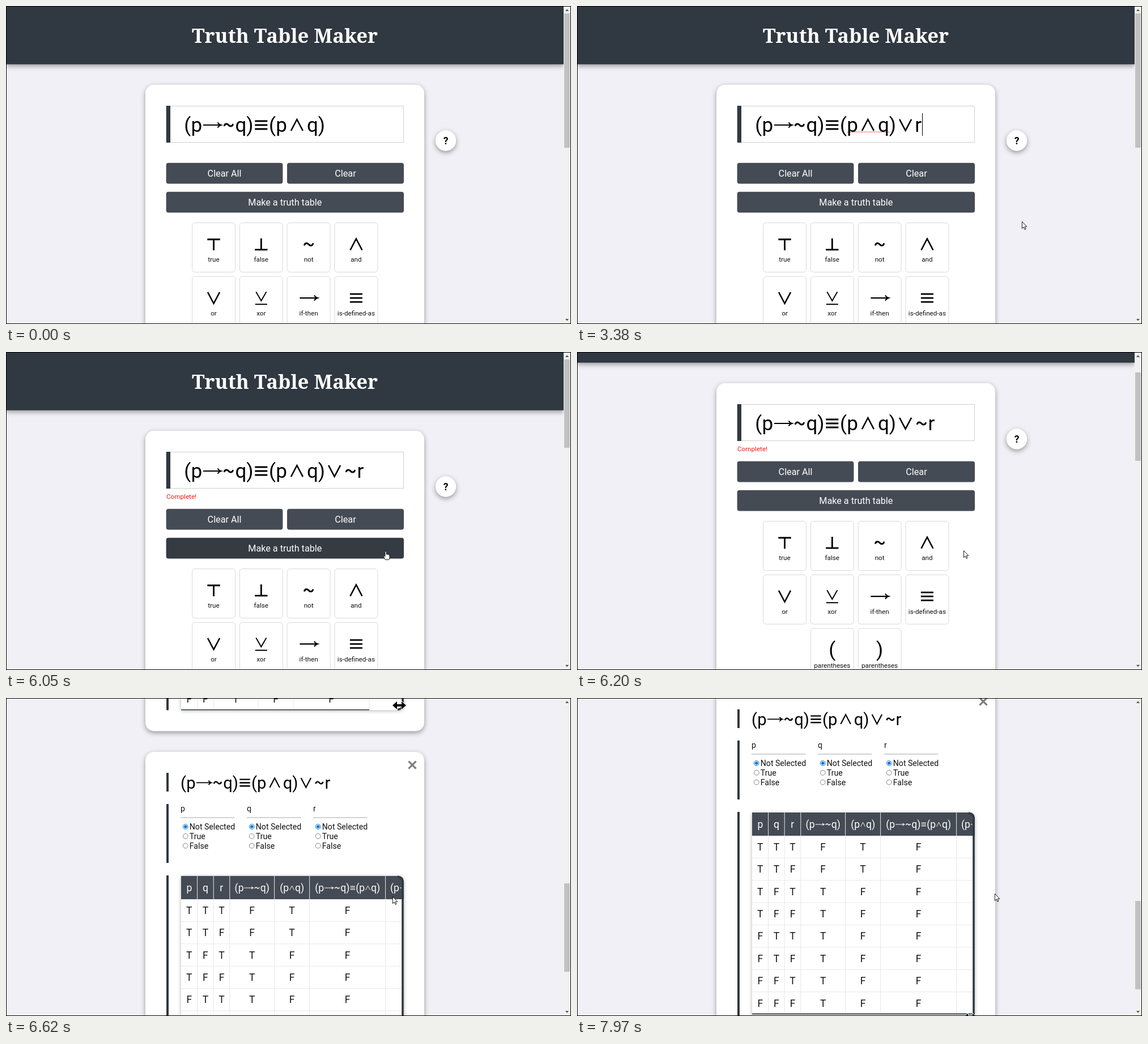
These frames come from a looping animation (997 by 561 pixels, 8 s). An HTML page:

```html
<!DOCTYPE html>
<html lang="en">
<head>
<meta charset="utf-8">
<title>Truth Table Maker</title>
<style>
html, body { margin: 0; width: 100%; height: 100%; overflow: hidden; background: #f1f0f6; }
svg { display: block; width: 997px; height: 561px; font-family: Roboto, sans-serif; }
.shade { filter: drop-shadow(0 3px 4px rgba(0, 0, 0, .38)); }
.soft { filter: drop-shadow(0 1px 3px rgba(0, 0, 0, .3)); }
</style>
</head>
<body>
<svg id="stage" viewBox="0 0 997 561"></svg>
<script>
const DARK = '#303841', BTN = '#454b54', BTN_HOVER = '#343b43';
const LOOP = 8000;

// Advance widths in em
const ADV = { '(': .349, ')': .349, p: .561, q: .568, r: .36, '~': .665, '→': 1, '≡': .786, '∧': 1, '∨': .95 };
const SMALL_ADV = { ...ADV, '∧': .62, '≡': .62 };

// Operators in em, centred on the origin
const OPS = {
  '~': 'M-.22 .06Q-.2 -.06 -.1 -.06C0 -.06 0 .06 .1 .06Q.2 .06 .22 -.06',
  '→': 'M-.45 0H.44M.28 -.13Q.34 -.03 .45 0Q.34 .03 .28 .13',
  '≡': 'M-.315 -.2H.315M-.315 0H.315M-.315 .2H.315',
  '∧': 'M-.3 .29L0 -.28L.3 .29',
  '∨': 'M-.3 -.29L0 .28L.3 -.29',
  '⊤': 'M-.32 -.25H.32M0 -.25V.3',
  '⊥': 'M-.32 .27H.32M0 .27V-.3',
  '⊻': 'M-.26 -.31L0 .14L.26 -.31M-.3 .32H.3'
};
const WEIGHT = { '~': .085, '→': .06, '≡': .083, '⊤': .08, '⊥': .08, '⊻': .054 };

const rect = (x, y, w, h, fill, extra = '') =>
  `<rect x="${x}" y="${y}" width="${w}" height="${h}" fill="${fill}" ${extra}/>`;
const path = (d, stroke, width = 1, extra = '') =>
  `<path d="${d}" fill="none" stroke="${stroke}" stroke-width="${width}" ${extra}/>`;
const text = (s, x, y, size, fill = '#000', anchor = 'start', weight = 400) =>
  `<text x="${x}" y="${y}" font-size="${size}" fill="${fill}" text-anchor="${anchor}" font-weight="${weight}">${s}</text>`;
const op = (c, x, y, size, color) =>
  path(OPS[c], color, WEIGHT[c] || .072, `transform="translate(${x} ${y}) scale(${size})"`);

const widthOf = (s, size, adv = ADV) => [...s].reduce((w, c) => w + adv[c], 0) * size;

function formula(s, x, y, size, color = '#000', adv = ADV) {
  let out = '';
  for (const c of s) {
    const w = adv[c] * size;
    const shrink = adv[c] < ADV[c] ? .75 : 1;
    out += OPS[c] ? op(c, x + w / 2, y - .343 * size, size * shrink, color)
                  : text(c, x, y, size, color);
    x += w;
  }
  return out;
}

const BUTTONS = [
  { id: 'all', x: 282.6, y: 276.7, w: 205.8, label: 'Clear All' },
  { id: 'clear', x: 496, y: 276.7, w: 206, label: 'Clear' },
  { id: 'make', x: 282.6, y: 327.8, w: 419.4, label: 'Make a truth table' }
];
const BTN_H = 36.7;
const KEYS = [
  ['⊤', 'true'], ['⊥', 'false'], ['~', 'not'], ['∧', 'and'],
  ['∨', 'or'], ['⊻', 'xor'], ['→', 'if-then'], ['≡', 'is-defined-as'],
  ['(', 'parentheses'], [')', 'parentheses']
];

function drawKey([sym, label], i) {
  const col = i < 8 ? i % 4 : i - 7, row = i >> 2;
  const x = 328.5 + col * 83.8, y = 382.5 + row * 94.6, cx = x + 38;
  const mark = OPS[sym] ? op(sym, cx, y + 38, 35, '#000')
                        : text(sym, cx, y + 49.5, 35, '#000', 'middle');
  return rect(x, y, 76, 87, '#fff', 'rx="5" stroke="#d9d9d9"') + mark +
    text(label, cx, y + 68.8, 11.68, '#111', 'middle');
}

const BASE = '(p→~q)≡(p∧q)';
const FULL = BASE + '∨~r';

function drawTable(vars, id) {
  const top = 219, head = 41, pitch = 39.37, wide = vars.length > 2;
  const rows = 2 ** vars.length, bottom = top + head + rows * pitch;
  const end = bottom + (wide ? 14 : 0);
  const heads = [...vars, '(p→~q)', '(p∧q)', BASE];
  const edges = [309];
  heads.forEach((h, i) => edges.push(edges[i] + (h.length < 2 ? 28.6 : [78.8, 62, 134][i - vars.length])));
  const right = wide ? 702 : edges[edges.length - 1];
  const mid = i => (edges[i] + edges[i + 1]) / 2;
  const shape = `M309 ${top}H691Q702 ${top} 702 ${top + 11}V${end - 11}Q702 ${end} 691 ${end}H309Z`;

  let body = rect(309, top, right - 309, head, BTN);
  heads.forEach((h, i) => {
    body += formula(h, mid(i) - widthOf(h, 17.52, SMALL_ADV) / 2, top + 27, 17.52, '#fff', SMALL_ADV);
    body += path(`M${edges[i + 1]} ${top}v${head}`, '#e8e8ea') +
            path(`M${edges[i + 1]} ${top + head}V${bottom}`, '#e6e6e8');
  });
  if (wide) body += `<g clip-path="url(#${id}x)">${formula(FULL, 678, top + 27, 17.52, '#fff', SMALL_ADV)}</g>`;
  for (let r = 0; r < rows; r++) {
    const y = top + head + r * pitch;
    const vals = vars.map((_, i) => !(r >> (vars.length - 1 - i) & 1));
    const cond = !vals[0] || !vals[1], both = vals[0] && vals[1];
    [...vals, cond, both, cond === both].forEach((v, i) => {
      body += text(v ? 'T' : 'F', mid(i), y + 26, 17.52, '#111', 'middle');
    });
    if (r) body += path(`M309 ${y}H${right}`, '#e9e9eb');
  }
  body += rect(309, bottom - 1.5, right - 309, 2, DARK);

  const iy = end - 8.5;
  const icon = `M682 ${iy}l8 -7v5h8v-5l8 7l-8 7v-5h-8v5z`;
  return `<clipPath id="${id}"><path d="${shape}"/></clipPath>
    <clipPath id="${id}x">${rect(670, top, 28, head, '#000')}</clipPath>` +
    rect(283, 218, 4, end - 218, DARK) +
    `<path d="${shape}" fill="#fff" class="soft"/><g clip-path="url(#${id})">${body}</g>` +
    path(`M691 ${top + 1}Q700 ${top + 2} 700 ${top + 11}V${end - 11}Q700 ${end - 2} 691 ${end - 1}`, DARK, 3.6) +
    `<path d="${icon}" stroke="#fff" stroke-width="1.5" paint-order="stroke"/>`;
}

function drawCard(y, h, title, vars, id) {
  let out = rect(246, 0, 492, h, '#fff', 'rx="15" class="shade"') +
    path('M710.5 16.7l13 13m0 -13l-13 13', '#7d7d7d', 3.2) +
    rect(283, 37, 4, 33, DARK) + rect(283, 92, 4, 104, DARK) +
    formula(title, 308, 64.5, 29.2);
  vars.forEach((v, i) => {
    const x = 308 + i * 117;
    out += text(v, x, 105, 14, '#111') + rect(x, 115.5, 95.5, 1, '#a8a8a8');
    ['Not Selected', 'True', 'False'].forEach((label, k) => {
      const cy = 132 + k * 16.8;
      out += `<circle cx="${x + 8.7}" cy="${cy}" r="4.4" fill="#fff" stroke="${k ? '#858585' : '#0a78d8'}"/>`;
      if (!k) out += `<circle cx="${x + 8.7}" cy="${cy}" r="2.8" fill="#0a78d8"/>`;
      out += text(label, x + 15.8, cy + 5, 14.1, '#111');
    });
  });
  return `<g transform="translate(0 ${y})">${out}${drawTable(vars, id)}</g>`;
}

const page =
  rect(0, -10, 984, 112.8, DARK, 'class="shade"') +
  `<text x="492" y="64.6" font-size="34.6" font-weight="700" fill="#fff" text-anchor="middle" font-family="'Noto Serif', serif">Truth Table Maker</text>` +
  rect(246, 139, 492, 560, '#fff', 'rx="15" class="shade"') +
  rect(283.5, 176.5, 418, 64, '#fff', 'stroke="#d0d0d0"') + rect(282.7, 176, 7.3, 65, DARK) +
  path('M477 223' + 'l1.5 -1.5l1.5 1.5'.repeat(25), '#f03a30', .8, 'id="spell"') +
  '<g id="input"></g>' + rect(563, 189, 1, 40, '#000', 'id="caret"') +
  `<g id="done">${text('Complete!', 283, 259, 11.68, '#ee1c12')}</g>` +
  BUTTONS.map(b => rect(b.x, b.y, b.w, BTN_H, BTN, `rx="4" id="${b.id}"`) +
    text(b.label, b.x + b.w / 2, b.y + 24.3, 16.2, '#fff', 'middle')).join('') +
  KEYS.map(drawKey).join('') +
  '<circle cx="776" cy="237.5" r="18.2" fill="#fff" class="shade"/>' +
  text('?', 776, 244, 17.5, '#000', 'middle', 700) +
  drawCard(736, 454.5, BASE, ['p', 'q'], 'two') +
  drawCard(1227, 626, FULL, ['p', 'q', 'r'], 'three');

const cursors = `
  <g id="cursor">
    <path id="arrow" d="M.4 .4V12.6L3.2 10L5.1 14.3L7 13.5L5.1 9.3H8.8Z" fill="#fff" stroke="#000" stroke-width=".9"/>
    <path id="beam" d="M-2.8 -5.5H-.6L0 -5L.6 -5.5H2.8M0 -5V5M-2.8 5.5H-.6L0 5L.6 5.5H2.8" fill="none" stroke="#222"/>
    <path id="hand" d="M-1.2 1Q0 -.6 1.2 1V6Q2.4 5 3.4 6.3Q4.6 5.6 5.4 6.8Q7 6.4 7 8V11Q7 13 5.6 15.5H-.6Q-2 12 -4 10Q-4.2 8 -2.6 8.6L-1.2 10Z" fill="#fff" stroke="#000" stroke-width=".9"/>
  </g>`;

const stage = document.getElementById('stage');
stage.innerHTML = rect(0, 0, 997, 561, '#f1f0f6') + `<g id="page">${page}</g>` +
  rect(984, 0, 13, 561, '#f1f1f1') + rect(985, 13, 10, 237, '#c1c1c1', 'id="thumb"') +
  '<path d="M987 9l3 -3.5l3 3.5zM987 552l3 3.5l3 -3.5z" fill="#505050"/>' +
  cursors + rect(.5, .5, 996, 560, 'none', 'stroke="#000"');
const el = id => document.getElementById(id);

// Last entry whose time has passed
const at = (list, t) => list.filter(e => e[0] <= t).pop();

const TYPED = [[0, ''], [2570, '∨'], [3380, '∨r'], [4570, '∨~r']];
// time, caret position (0 = hidden)
const CARET = [[0, 0], [980, 12], [1510, 0], [2040, 12], [2570, 13], [3050, 0], [3380, 14],
  [3920, 0], [4240, 13], [4570, 14], [5100, 0], [5630, 14], [6000, 0]];

// start, last step, steps, then from, control and end point
const MOVES = [
  [260, 980, 11, [838, 505], [720, 300], [612, 215]],
  [1180, 1510, 5, [612, 215], [745, 225], [785, 380]],
  [5500, 5770, 5, [785, 380], [720, 366], [670, 351]],
  [6130, 6200, 2, [670, 351], [676, 350], [682, 350]],
  [7150, 7560, 7, [682, 350], [700, 328], [737, 345]]
];

function pointer(t) {
  const m = at(MOVES, t);
  if (!m) return null;
  const [a, b, n, p, c, q] = m;
  const k = Math.min(1, (Math.floor((t - a) / (b - a) * (n - 1) + 1e-6) + 1) / n);
  return p.map((v, i) => (1 - k) ** 2 * v + 2 * k * (1 - k) * c[i] + k * k * q[i]);
}

// cubic-bezier(.42, 0, .58, 1)
function easeInOut(x) {
  let lo = 0, hi = 1;
  for (let i = 0; i < 24; i++) {
    const s = (lo + hi) / 2;
    if (1.26 * s * (1 - s) ** 2 + 1.74 * s * s * (1 - s) + s ** 3 < x) lo = s; else hi = s;
  }
  return lo * lo * (3 - 2 * lo);
}

function scrollAt(t) {
  if (t < 6130) return 0;
  if (t < 7770) {
    const held = 6060 + Math.floor((t - 6060) / 70) * 70;
    return 1227 * easeInOut(Math.min(1, (held - 6076.1) / 675.5));
  }
  const held = 7770 + Math.min(3, Math.floor((t - 7770) / 66.6)) * 66.67;
  return 1227 + 16.6 * ((held - 7730) / 240) ** 2;
}

const inside = (p, x, y, w, h) => p && p[0] >= x && p[0] < x + w && p[1] >= y && p[1] < y + h;
const show = (id, on) => el(id).setAttribute('visibility', on ? 'visible' : 'hidden');
let shown;

function draw(t) {
  const scroll = Math.round(scrollAt(t)), made = t >= 6000, mouse = pointer(t);
  el('page').setAttribute('transform', `translate(0 ${-scroll})`);
  el('thumb').setAttribute('y', Math.round(13 + scroll * .2776));
  el('thumb').setAttribute('height', made ? 156 : 237);
  show('done', made);
  show('spell', t >= 2570 && !made);

  const value = BASE + at(TYPED, t)[1];
  if (value !== shown) el('input').innerHTML = formula(shown = value, 314.3, 222, 35);
  const caret = at(CARET, t)[1];
  show('caret', caret);
  el('caret').setAttribute('x', Math.round(314.3 + widthOf(value.slice(0, caret), 35)));

  const spot = mouse && [mouse[0], mouse[1] + scroll];
  let kind = inside(spot, 283, 176, 419, 65) ? 'beam' : 'arrow';
  for (const b of BUTTONS) {
    const over = inside(spot, b.x, b.y, b.w, BTN_H);
    if (over) kind = 'hand';
    el(b.id).setAttribute('fill', over ? BTN_HOVER : BTN);
  }
  for (const id of ['arrow', 'beam', 'hand']) show(id, mouse && id === kind);
  if (mouse) el('cursor').setAttribute('transform', `translate(${mouse})`);
}

const start = performance.now();
function tick() {
  draw((performance.now() - start) % LOOP);
  requestAnimationFrame(tick);
}
tick();
</script>
</body>
</html>
```
